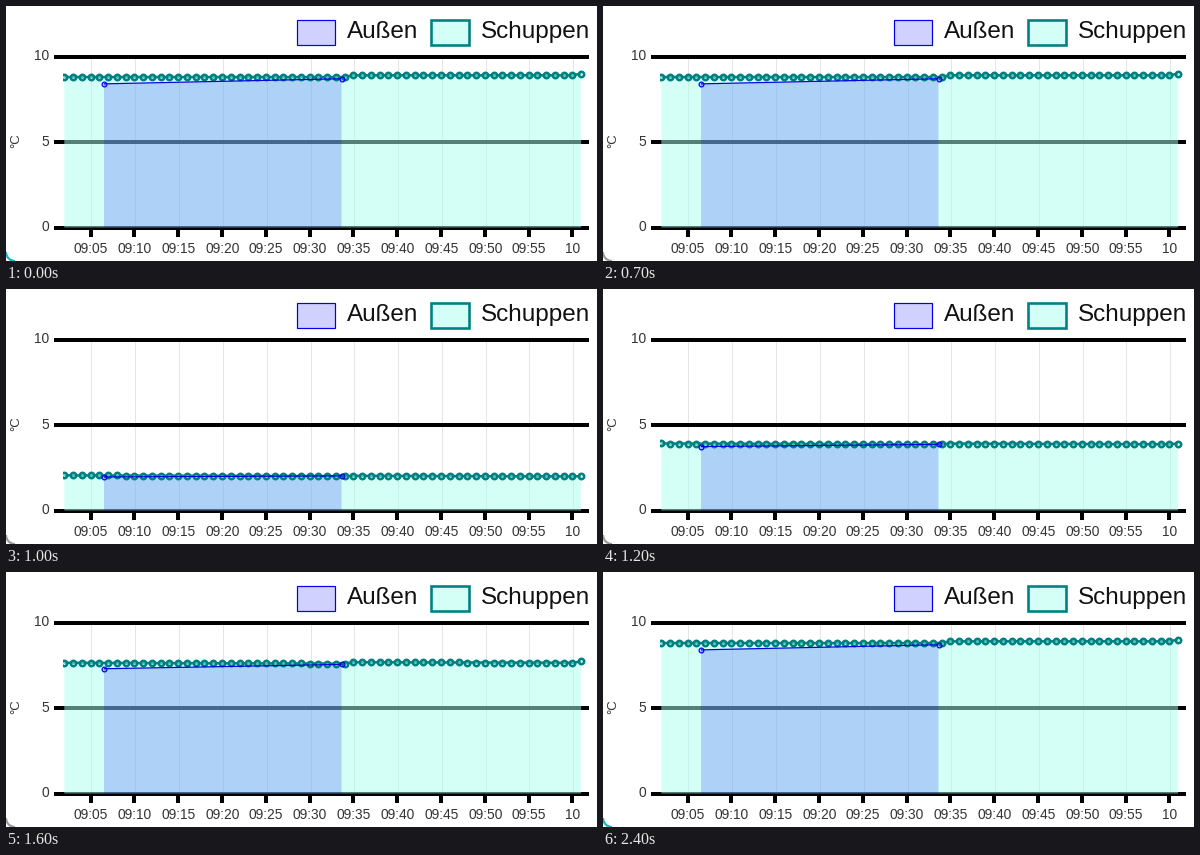
Write a matplotlib script that moves like this. It is 591 by 255 pixels and loops after 2500 ms.

```python
import numpy as np
import matplotlib.pyplot as plt
from matplotlib.animation import FuncAnimation
from matplotlib.patches import Arc, Rectangle

W, H, DPI = 591, 255, 64  # a power of two keeps the pixel size exact
FRAMES, STEP = 25, 100
PX = 72 / DPI
LEFT, RIGHT, TOP, BASE = 58, 583, 50.5, 221.5
UNIT = (BASE - TOP) / 10
MINUTE = 8.76

TEAL, TEAL_FILL = "#008080", (171 / 255, 1, 239 / 255, 0.5)
BLUE, BLUE_FILL = "#0000e6", (0, 0, 1, 0.18)
ACTIVE, IDLE = "#12b5c4", "#9a9a9a"

plt.rcParams["font.family"] = "Liberation Sans"
fig = plt.figure(figsize=(W / DPI, H / DPI), dpi=DPI, facecolor="white")
ax = fig.add_axes([0, 0, 1, 1])
ax.set(xlim=(0, W), ylim=(H, 0))
ax.axis("off")


def line(x, y, color, width, z):
    return ax.plot(x, y, color=color, lw=width * PX, zorder=z,
                   solid_capstyle="butt")[0]


def label(x, y, text, size, color="#333333", **kw):
    ax.text(x, y, text, fontsize=size * PX, color=color, zorder=9, **kw)


def legend(x, width, text, text_x, edge, fill, border):
    ax.add_patch(Rectangle((x, 13.5), width, 25, fc=fill, ec=edge,
                           lw=border * PX, zorder=5))
    label(text_x, 32, text, 24.3, "#111111", va="baseline")


class Series:
    """Filled line with round points that grows from the base line."""

    def __init__(self, x, values, lag, edge, fill, width, radius, z):
        self.x, self.values, self.lag = x, values, lag
        # The chart area cuts off markers on its left edge.
        clip = Rectangle((LEFT - 1, TOP - 2), RIGHT - LEFT + 1,
                         BASE - TOP + 4, transform=ax.transData)
        self.area = ax.fill(x, x * 0 + BASE, fc=fill, lw=0, zorder=z)[0]
        self.line = line(x, x * 0, edge, width, z + 2)
        self.dots = ax.plot(x, x * 0, ls="none", marker="o",
                            ms=2 * radius * PX, mfc=fill, mec=edge,
                            mew=width * PX, zorder=z + 2.5)[0]
        for artist in (self.line, self.dots):
            artist.set_clip_path(clip)

    def grow(self, progress):
        part = np.clip(progress - self.lag, 0, 1)
        y = BASE - self.values * UNIT * part
        self.line.set_ydata(y)
        self.dots.set_ydata(y)
        xs = np.concatenate([self.x, self.x[[-1, 0]]])
        ys = np.append(y, [BASE, BASE])
        self.area.set_xy(np.column_stack([xs, ys]))


# Grid, ticks and labels
for i in range(12):
    x = 84.5 + i * 5 * MINUTE
    line([round(x) + 0.5] * 2, [TOP, BASE], "#e5e5e5", 1, 1)
    line([x, x], [BASE, 231], "black", 4, 1)
    text = f"09:{5 + 5 * i:02d}" if i < 11 else "10"
    label(x + 0.5, 247, text, 13.8, ha="center", va="baseline")
for v in (0, 5, 10):
    y = BASE - v * UNIT
    line([47.5, RIGHT], [y, y], "black", 4, 1.5)
    label(43.5, y + 3.7, str(v), 13.8, ha="right", va="baseline")
label(10.5, 135, "°C", 13.3, rotation=90, ha="center", va="center")

legend(290.5, 38, "Außen", 341, BLUE, BLUE_FILL, 1.2)
legend(425, 38, "Schuppen", 475, TEAL, TEAL_FILL, 2.6)

n = np.arange(60)
shed = Series(58.3 + MINUTE * n,
              np.where(n < 33, 8.8, np.where(n < 59, 8.9, 9.0)),
              0.010 * n / 59, TEAL, TEAL_FILL, 2.5, 2.7, 2)
outside = Series(np.array([98.0, 335.5]), np.array([8.4, 8.7]),
                 np.array([0, 0.001]), BLUE, BLUE_FILL, 1.2, 2.4, 3)

corner = Arc((9, 246), 18, 18, theta1=90, theta2=180, lw=2.2 * PX, zorder=9)
ax.add_patch(corner)


def update(i):
    t = i * STEP
    progress = 1.1 if t < 800 else min(0.022 + (t - 800) / 945, 1.1)
    shed.grow(progress)
    outside.grow(progress)
    corner.set_edgecolor(IDLE if 400 <= t < 2200 else ACTIVE)
    return []


anim = FuncAnimation(fig, update, frames=FRAMES, interval=STEP, repeat=True,
                     repeat_delay=0, blit=False)
plt.show()
```
